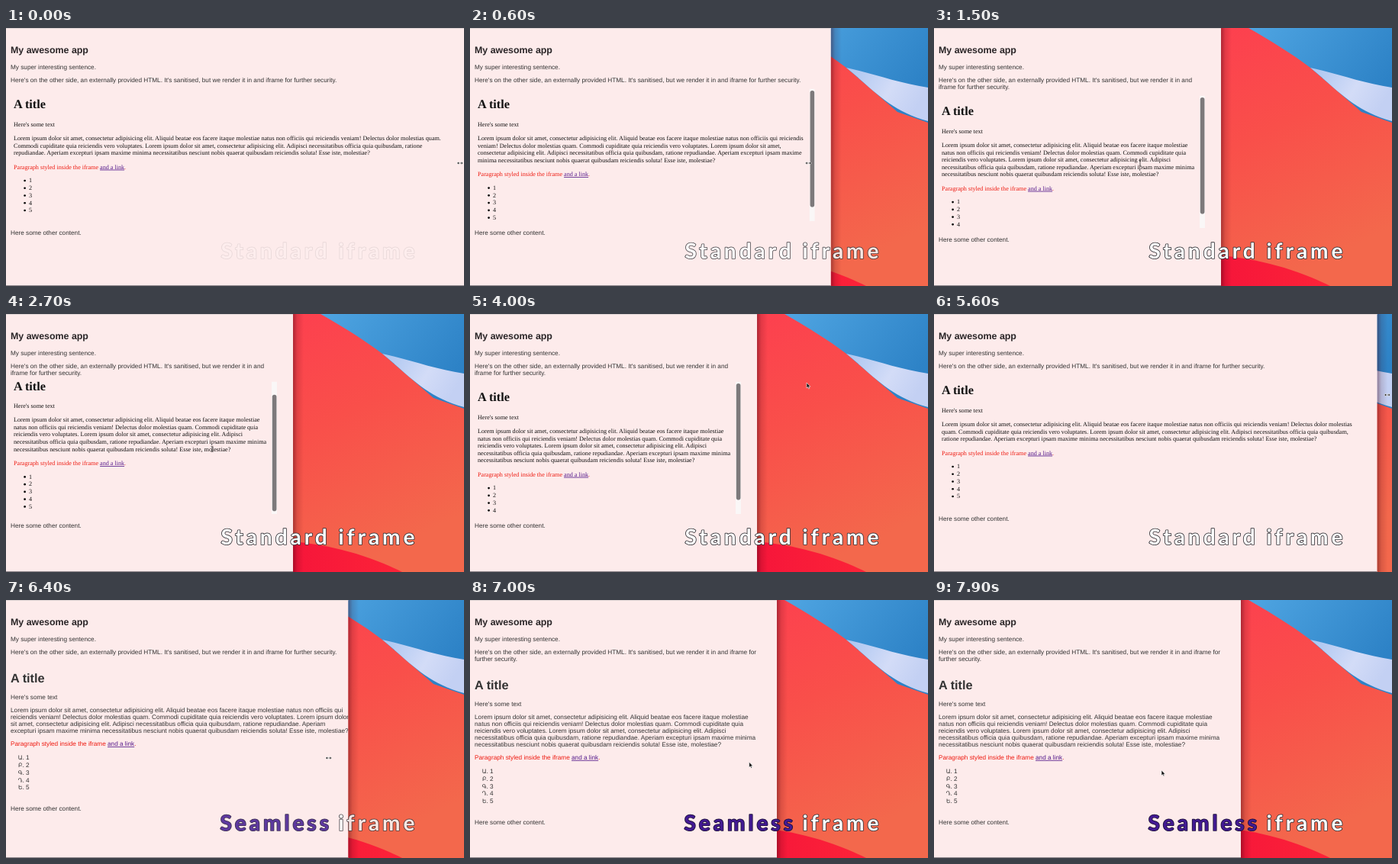
An HTML page that plays this animation: 600 px wide and 338 px high, repeating every 8000 ms.

```html
<!DOCTYPE html>
<html lang="en">
<head>
<meta charset="utf-8">
<title>Standard and seamless iframe</title>
<style>
  html, body { margin: 0; width: 100%; height: 100%; overflow: hidden; }
  svg { display: block; width: 100vw; height: 100vh; }
  text { text-rendering: geometricPrecision; white-space: pre; }
  .sans { font: 8.22px "Liberation Sans", Arial, sans-serif; fill: #333; }
  .serif { font: 8.13px "Liberation Serif", Times, serif; fill: #111; }
  .h2 { font-size: 12.4px; font-weight: bold; fill: #2b2628; }
  .h1 { font-size: 16.3px; font-weight: bold; }
  .red { fill: #ee1a10; }
  .link { fill: #551a8b; text-decoration: underline; }
  .marker { font: 7.6px "DejaVu Sans", sans-serif; text-anchor: end; }
  .caption { font: bold 28px Lato, sans-serif; letter-spacing: 4px; fill: #fff;
    stroke: #35353a; stroke-width: 1.7; stroke-linejoin: round; paint-order: stroke; }
  .purple { fill: #431a94; stroke: #1d1238; }
</style>
</head>
<body>
<svg viewBox="0 0 600 338" preserveAspectRatio="none">
  <defs>
    <linearGradient id="red" x1="0" y1="0" x2=".35" y2="1">
      <stop offset="0" stop-color="#fd3f4f"/>
      <stop offset=".45" stop-color="#f94f4a"/>
      <stop offset="1" stop-color="#f3684c"/>
    </linearGradient>
    <linearGradient id="blue" x1="0" y1="0" x2="1" y2=".5">
      <stop offset="0" stop-color="#4fa5e2"/>
      <stop offset="1" stop-color="#2d82c6"/>
    </linearGradient>
    <linearGradient id="pale" x1="0" y1="0" x2="1" y2=".4">
      <stop offset="0" stop-color="#a9c4f0"/>
      <stop offset=".6" stop-color="#d3dcf7"/>
      <stop offset="1" stop-color="#c3d0f3"/>
    </linearGradient>
    <linearGradient id="crimson" x1="0" y1="0" x2="1" y2="0">
      <stop offset="0" stop-color="#f5143a"/>
      <stop offset="1" stop-color="#fc2338"/>
    </linearGradient>
    <linearGradient id="shade">
      <stop offset="0" stop-color="#400010" stop-opacity=".42"/>
      <stop offset=".4" stop-color="#400010" stop-opacity=".14"/>
      <stop offset="1" stop-color="#400010" stop-opacity="0"/>
    </linearGradient>
    <clipPath id="windowClip"><rect id="windowClipBox" height="338"/></clipPath>
    <clipPath id="frameClip"><rect id="frameClipBox" x="6" height="173.5"/></clipPath>
  </defs>
  <rect x="360" width="240" height="338" fill="url(#red)"/>
  <path d="M412 0C440 16 468 33 493 52L560 110L600 124V0Z" fill="url(#blue)"/>
  <path d="M493 52C530 60 560 72 600 78V122C550 108 530 82 493 52Z" fill="url(#pale)"/>
  <path d="M360 297C420 300 475 316 519 338H360Z" fill="url(#crimson)"/>
  <rect id="shadow" y="0" width="14" height="338" fill="url(#shade)"/>
  <g clip-path="url(#windowClip)">
    <rect width="600" height="338" fill="#fdebeb"/>
    <g id="page"></g>
    <rect width="600" height=".8" fill="#d5cccd"/>
    <rect y="337" width="600" height="1" fill="#8a8287"/>
  </g>
  <g id="caption"></g>
  <g id="cursor"></g>
</svg>
<script>
const DURATION = 8000, STEP = 100, CUT = 5800;
const SANS = { name: 'sans', size: 8.22, font: '"Liberation Sans", Arial, sans-serif' };
const SERIF = { name: 'serif', size: 8.13, font: '"Liberation Serif", Times, serif' };
const INTRO = "Here's on the other side, an externally provided HTML. It's sanitised, but we render it in and iframe for further security.";
const LOREM = 'Lorem ipsum dolor sit amet, consectetur adipisicing elit. Aliquid beatae eos facere itaque molestiae natus non officiis qui reiciendis veniam! Delectus dolor molestias quam. Commodi cupiditate quia reiciendis vero voluptates. Lorem ipsum dolor sit amet, consectetur adipisicing elit. Adipisci necessitatibus officia quia quibusdam, ratione repudiandae. Aperiam excepturi ipsam maxime minima necessitatibus nesciunt nobis quaerat quibusdam reiciendis soluta! Esse iste, molestiae?';

const el = id => document.getElementById(id);
const pen = document.createElement('canvas').getContext('2d');

const clamp = x => Math.min(1, Math.max(0, x));
const ease = (t, start, end) => {
  const u = clamp((t - start) / (end - start));
  return u * u * (3 - 2 * u);
};
const mix = (a, b, u) => a + (b - a) * u;

function wrap(text, face, width) {
  pen.font = `100px ${face.font}`;
  const lines = [];
  let line = '';
  for (const word of text.split(' ')) {
    const longer = line ? line + ' ' + word : word;
    if (line && pen.measureText(longer).width * face.size / 100 > width) {
      lines.push(line);
      line = word;
    } else line = longer;
  }
  return [...lines, line];
}

const text = (x, y, content, style) => `<text x="${x}" y="${y}" class="${style}">${content}</text>`;
const block = (x, y, lines, gap, style) => lines.map((s, i) => text(x, y + i * gap, s, style)).join('');
const redLine = (x, y, style) => text(x, y,
  '<tspan class="red">Paragraph styled inside the iframe </tspan><tspan class="link">and a link</tspan><tspan class="red">.</tspan>', style);

function intro(width) {
  const lines = wrap(INTRO, SANS, width - 29);
  return {
    drop: (lines.length - 1) * 9,
    svg: text(6, 33.2, 'My awesome app', 'sans h2') +
      text(6, 53.7, 'My super interesting sentence.', 'sans') +
      block(6, 71, lines, 8.8, 'sans')
  };
}

function standardPage(width, scroll) {
  const { drop, svg } = intro(width);
  let lines = wrap(LOREM, SERIF, width - 34);
  const scrolls = lines.length > 3;
  if (scrolls) lines = wrap(LOREM, SERIF, width - 40);
  const top = 79.5 + drop, after = (lines.length - 3) * 9.55;
  el('frameClipBox').setAttribute('y', top);
  el('frameClipBox').setAttribute('width', Math.max(0, width - 27));
  let list = '';
  for (let i = 0; i < 5; i++) {
    const y = 202.3 + after + i * 9.75;
    list += `<circle cx="24.6" cy="${y - 2.3}" r="1.35"/>` + text(30, y, i + 1, 'serif');
  }
  const bar = scrolls
    ? `<rect x="${width - 28}" y="${top}" width="7" height="173.5" fill="#faf7f7"/>
       <rect x="${width - 27.2}" y="${top + 2.5 + scroll}" width="5.6" height="152.5" rx="2.8" fill="#7d797b"/>`
    : '';
  return svg + `<g clip-path="url(#frameClip)"><g transform="translate(0 ${drop - scroll})">` +
    text(10, 105.4, 'A title', 'serif h1') +
    text(10, 128.8, "Here's some text", 'serif') +
    block(10, 147.1, lines, 9.55, 'serif') +
    redLine(10, 184.6 + after, 'serif') + list + `</g>${bar}</g>` +
    text(6, 271.3 + drop, 'Here some other content.', 'sans');
}

function seamlessPage(width) {
  const { drop, svg } = intro(width);
  const lines = wrap(LOREM, SANS, width - 29);
  const shift = drop + (lines.length - 4) * 8.9;
  const list = [...'ԱԲԳԴԵ'].map((letter, i) => {
    const y = 209 + shift + i * 9.85;
    return text(24, y, letter + '.', 'sans marker') + text(26, y, i + 1, 'sans');
  }).join('');
  return svg +
    text(6, 107.6 + drop, 'A title', 'sans h1') +
    text(6, 129.8 + drop, "Here's some text", 'sans') +
    block(6, 147 + drop, lines, 8.9, 'sans') +
    redLine(6, 191 + shift, 'sans') + list +
    text(6, 276 + shift, 'Here some other content.', 'sans');
}

function windowWidth(t, seamless) {
  if (seamless) return mix(600, 402, ease(t, 5700, 6720));
  return 600 - 224 * ease(t, 0, 1100) + 224 * ease(t, 4700, 5800);
}

// Pointer position and shape; while dragging it runs one step ahead of the edge.
function pointer(t, seamless) {
  const edge = windowWidth(t + STEP, seamless);
  if (seamless) {
    if (t < 6750) return [edge - 3, 207, 'resize'];
    const u = ease(t, 6750, 7400);
    return [mix(399, 298, u), mix(207, 223, u), 'arrow'];
  }
  if (t < 1050) return [edge, 177, 'resize'];
  if (t < 2900) {
    const u = ease(t, 1050, 1450);
    return [mix(376, 270, u), 177, 'beam'];
  }
  if (t < 4100) {
    const u = ease(t, 2900, 3700);
    return [mix(270, 441, u), mix(177, 90, u), u < .4 ? 'beam' : 'arrow'];
  }
  if (t < 4600) {
    const u = ease(t, 4100, 4600);
    return [mix(441, 378, u), mix(90, 106, u), 'arrow'];
  }
  return [edge - 1, 106, 'resize'];
}

const SHAPES = {
  arrow: '<path d="M0 0V7L1.6 5.6L2.7 8L3.8 7.5L2.8 5.2H4.9Z" fill="#111" stroke="#fff" stroke-width=".6"/>',
  beam: '<path d="M-1.4-3.6Q0-3.6 0-2.6Q0-3.6 1.4-3.6M0-2.6V2.6M-1.4 3.6Q0 3.6 0 2.6Q0 3.6 1.4 3.6" fill="none" stroke="#333" stroke-width=".8"/>',
  resize: '<path d="M-4 0L-1.6-2V-.6H1.6V-2L4 0L1.6 2V.6H-1.6V2Z" fill="#111" stroke="#fff" stroke-width=".6"/>'
};

function draw(t) {
  const seamless = t >= CUT;
  const width = windowWidth(t, seamless);
  const scroll = 14.7 * (ease(t, 1600, 2500) - ease(t, 2950, 3500));
  el('windowClipBox').setAttribute('width', width);
  el('shadow').setAttribute('x', width);
  el('page').innerHTML = seamless
    ? seamlessPage(windowWidth(t - STEP, true))
    : standardPage(width, scroll);

  const fade = seamless ? clamp(.1 + (t - CUT) / 800) : clamp(.1 + t / 800);
  el('caption').setAttribute('opacity', fade);
  el('caption').innerHTML =
    (seamless ? text(280.5, 302, 'Seamless', 'caption purple') : text(281.5, 302, 'Standard', 'caption')) +
    text(435.5, 302, 'iframe', 'caption');

  const [x, y, shape] = pointer(t, seamless);
  el('cursor').setAttribute('transform', `translate(${x} ${y})`);
  el('cursor').innerHTML = x < 597 ? SHAPES[shape] : '';
}

const start = performance.now();
let shown = -1;
function tick() {
  const step = Math.floor((performance.now() - start) % DURATION / STEP);
  if (step !== shown) draw((shown = step) * STEP);
  requestAnimationFrame(tick);
}
tick();
</script>
</body>
</html>
```
